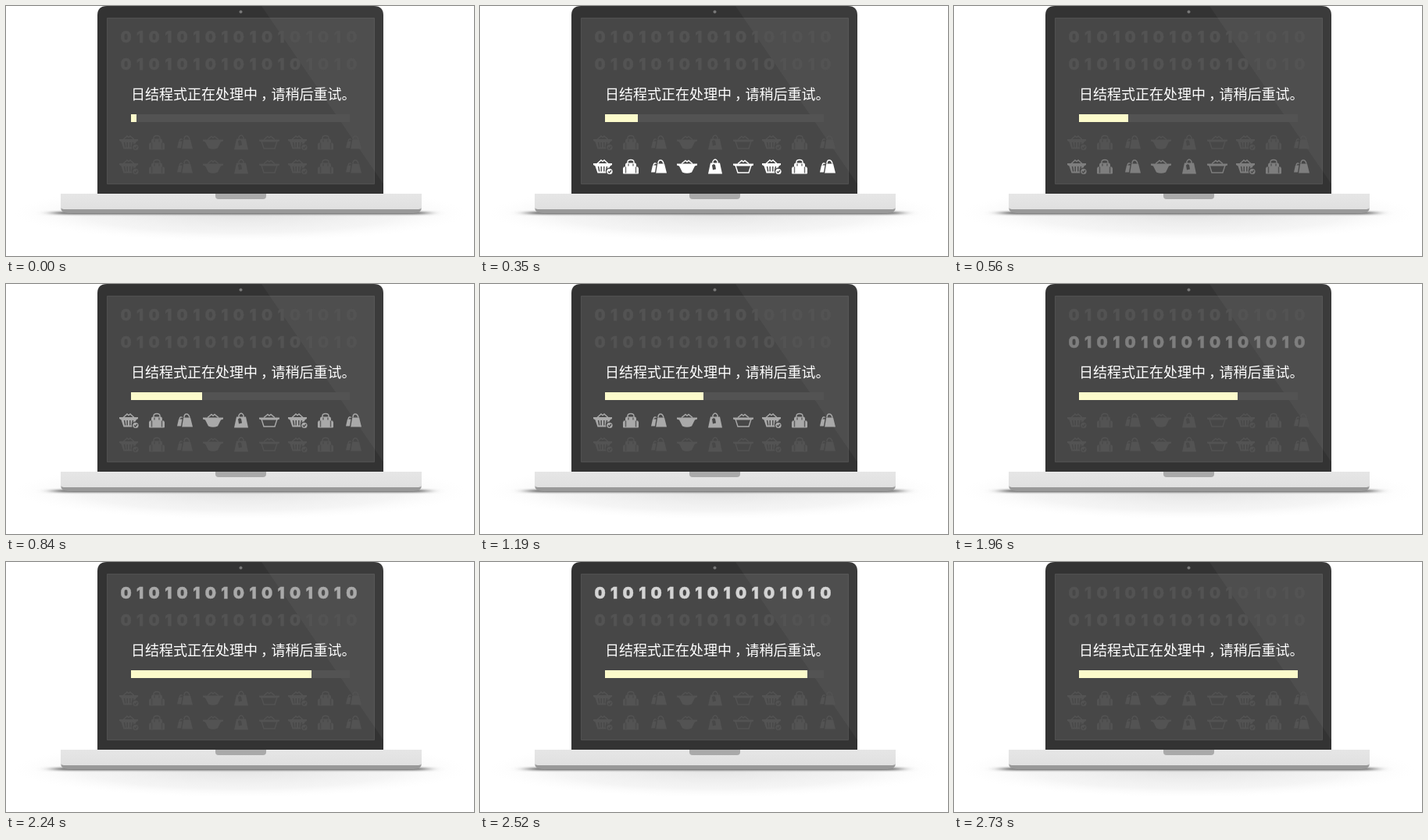
These frames come from a looping animation (599 px wide and 321 px high, 2800 ms). An HTML page:

```html
<!DOCTYPE html>
<html lang="zh-CN">
<head>
<meta charset="utf-8">
<style>
html, body { margin: 0; width: 100%; height: 100%; overflow: hidden; background: #fff; }
svg { display: block; }
.message { font: 18px "Noto Sans CJK SC", "Noto Sans CJK", sans-serif; fill: #fff; }
.digits { font: 900 20px Inter, "Liberation Sans", sans-serif; text-anchor: middle; stroke: currentColor; stroke-width: .4; }
.line { fill: none; stroke: currentColor; stroke-width: 1.4; }
.gap { fill: none; stroke: #484848; stroke-width: 1.4; }
.row { fill: currentColor; }
</style>
</head>
<body>
<svg width="599" height="321" viewBox="0 0 599 321">
  <defs>
    <radialGradient id="halo">
      <stop offset="0" stop-color="#bbb" stop-opacity=".4"/>
      <stop offset=".7" stop-color="#ccc" stop-opacity=".2"/>
      <stop offset="1" stop-color="#eee" stop-opacity="0"/>
    </radialGradient>
    <linearGradient id="base" x2="0" y2="1">
      <stop offset="0" stop-color="#e6e6e6"/>
      <stop offset="1" stop-color="#e0e0e0"/>
    </linearGradient>
    <filter id="soft" x="-10%" width="120%" y="-200%" height="500%">
      <feGaussianBlur stdDeviation="10 1"/>
    </filter>
    <clipPath id="lid"><path d="M117 241V12Q117 0 129 0H471Q483 0 483 12V241Z"/></clipPath>

    <g id="icon0">
      <path class="line" d="M-7-4L-2-8.5L0-7L2-8.5L7-4"/>
      <path d="M-12-4.5H12V-2.5L9.5-1L6.5 8H-6.5L-9.5-1L-12-2.5Z"/>
      <path class="gap" d="M-5.5-.5L-4.3 6M-1.8-.5V6M1.8-.5V6M5.5-.5L4.3 6"/>
      <circle class="gap" cx="9" cy="6" r="4.3"/>
      <circle cx="9" cy="6" r="3.6"/>
      <path class="gap" d="M7 6L8.5 7.5L11 4.5"/>
    </g>
    <g id="icon1">
      <path class="line" d="M-4-4V-6Q-4-9 0-9T4-6V-4"/>
      <path d="M-5-5H5Q7-5 7-2V0H9L10 2V8Q10 9 9 9H-9Q-10 9-10 8V2L-9 0H-7V-2Q-7-5-5-5Z"/>
      <path class="gap" stroke-opacity=".8" d="M-6.5 0V8M6.5 0V8M-3-4V-1M3-4V-1"/>
    </g>
    <g id="icon2">
      <path class="line" d="M-7-2Q-6-6-3-4M-1-4Q-1-8.5 2-8.5T6-4"/>
      <path d="M-8-2H-2V7H-10Z"/>
      <path d="M-2-4H7L10 8H-4Z"/>
      <path class="gap" d="M-2.5-4L-4.5 8"/>
    </g>
    <g id="icon3">
      <path class="line" d="M-7-4L-2-8L0-6.5L2-8L7-4"/>
      <path d="M-13-4H13V-2L10-1L6 7Q0 9.5-6 7L-10-1L-13-2Z"/>
    </g>
    <g id="icon4">
      <path class="line" d="M-3-4V-7Q0-12 3-7V-4"/>
      <path d="M-6-5H6L9 9H-9Z"/>
      <path d="M-4-2L-2-3.5L0-2.5L1 3L-3 4Z" fill="#484848"/>
    </g>
    <g id="icon5">
      <path class="line" d="M-7-4L-2-8L0-6.5L2-8L7-4M-10-2L-7 7.5H7L10-2"/>
      <path d="M-13-4H13V-2L10-1H-10L-13-2Z"/>
    </g>
  </defs>

  <ellipse cx="300" cy="266" rx="290" ry="36" fill="url(#halo)"/>
  <path d="M62 264H538V267.5H62Z" fill="#666" filter="url(#soft)"/>

  <g clip-path="url(#lid)">
    <path d="M116 0H484V241H116Z" fill="#333"/>
    <path d="M129.5 15.5H471.5V228.5H129.5Z" fill="#474747" stroke="#505050"/>
    <path d="M327 0H484V230Z" fill="#fff" fill-opacity=".04"/>
  </g>
  <circle cx="300.5" cy="7.5" r="2" fill="#777"/>

  <path d="M70 258H532Q532 266 522 266H80Q70 266 70 258Z" fill="#999"/>
  <path d="M70 241H532V259Q531 261 526 261H76Q71 261 70 259Z" fill="url(#base)"/>
  <path d="M268 241H333V244Q333 248 329 248H272Q268 248 268 244Z" fill="#aaa"/>

  <g id="rows"></g>
  <g class="message">
    <text x="160" y="120">日结程式正在处理中</text>
    <text x="326" y="120">，</text>
    <text x="339.5" y="120">请稍后重试。</text>
  </g>
  <path d="M160 139H440V149H160Z" fill="#535353"/>
  <rect id="bar" x="160" y="139" height="10" fill="#fcfbcb"/>
</svg>
<script>
const STEP = 70, STEPS = 40, ROW_STEPS = 10;
const DIM = 0x53;

const digitRow = y => `<g class="row digits">${
  Array.from({ length: 17 }, (_, i) => `<text x="${153.5 + 18.05 * i}" y="${y}">${i % 2}</text>`).join('')}</g>`;
const iconRow = y => `<g class="row">${
  Array.from({ length: 9 }, (_, i) => `<use href="#icon${i % 6}" x="${157 + 36 * i}" y="${y}"/>`).join('')}</g>`;

// Rows light up in this order, bottom to top.
const holder = document.getElementById('rows');
holder.innerHTML = iconRow(206.5) + iconRow(175.5) + digitRow(82) + digitRow(47);
const rows = [...holder.children];
const bar = document.getElementById('bar');

function draw(now) {
  const step = Math.floor(now / STEP) % STEPS;
  bar.setAttribute('width', 7 * (step + 1));
  rows.forEach((row, i) => {
    const k = step - i * ROW_STEPS;
    const glow = Math.max(0, Math.min(k, ROW_STEPS - 1 - k)) / 4;
    const grey = Math.round(DIM + (255 - DIM) * glow);
    row.style.color = `rgb(${grey},${grey},${grey})`;
  });
}

const start = performance.now();
function tick() {
  draw(performance.now() - start);
  requestAnimationFrame(tick);
}
tick();
</script>
</body>
</html>
```
